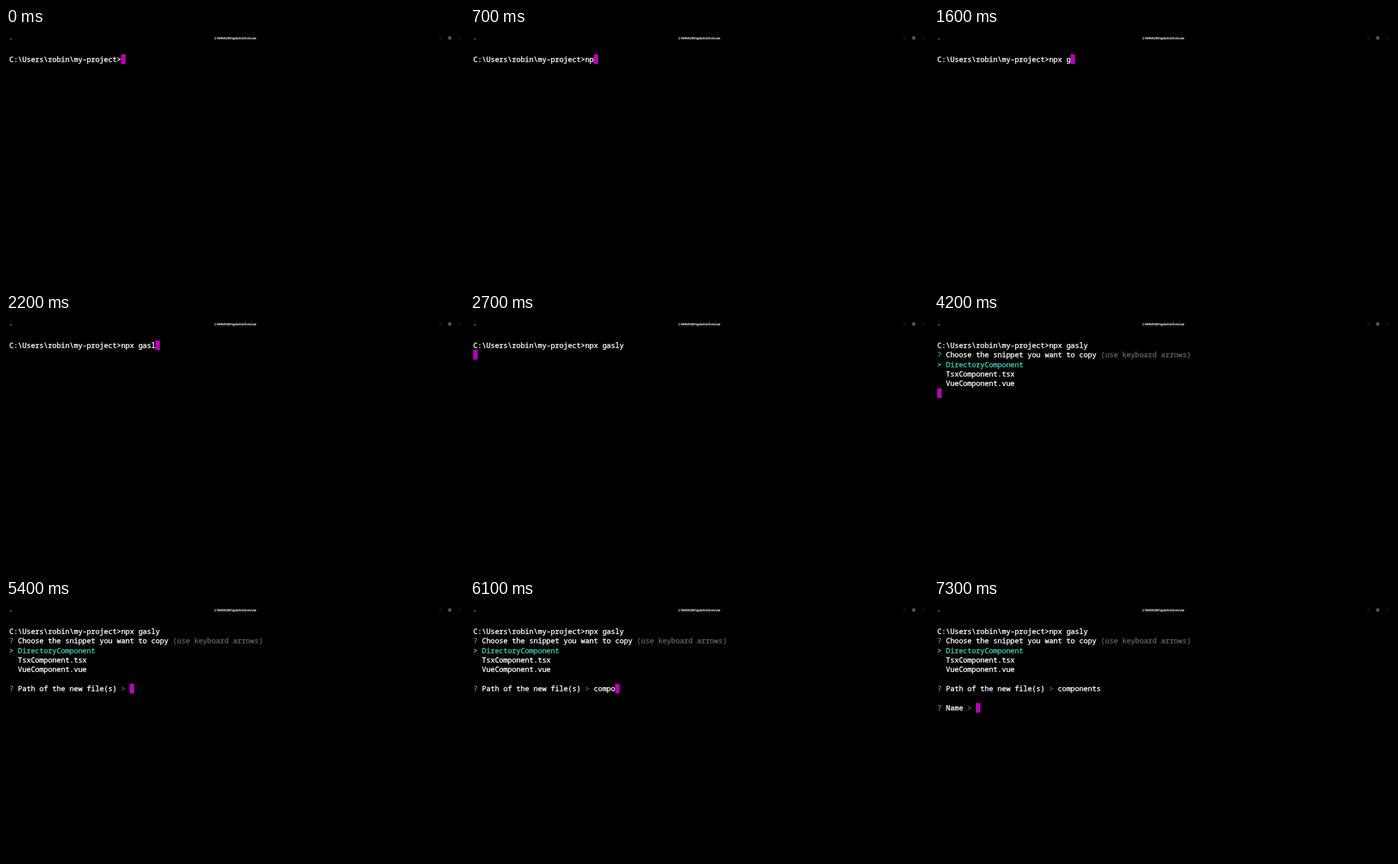
Animation of 690 by 388 pixels, one loop 8 s. Source, as an HTML page:

```html
<!DOCTYPE html>
<html lang="en">
<head>
<meta charset="utf-8">
<title>Terminal</title>
<style>
  html, body { margin: 0; width: 100%; height: 100%; overflow: hidden; background: #000; }
  svg { display: block; width: 690px; height: 388px; }
  text { white-space: pre; text-rendering: geometricPrecision; fill: currentColor; stroke: currentColor; }
  .term { font: 500 10.8px "Noto Sans Mono", "DejaVu Sans Mono", monospace; color: #fff; stroke-width: .35; }
  .title { font: italic 4.5px "Open Sans", "Noto Sans", sans-serif; color: #f4f4f4; stroke-width: .2; }
  .ask { color: #36b02c; }
  .dim { color: #626262; }
  .pick { color: #45cdbb; }
  .cursor { fill: #b800b4; }
</style>
</head>
<body>
<svg viewBox="0 0 690 388">
  <rect width="690" height="388"/>
  <g fill="none" stroke-width=".8">
    <path d="M6 16.5h3" stroke="#aaa"/>
    <path d="M653 15h3" stroke="#444"/>
    <path d="M667 13.5h3v3h-3z" stroke="#ccc"/>
    <path d="M682 14l2 2m0-2l-2 2" stroke="#444" stroke-width=".6"/>
  </g>
  <text class="title" x="345.5" y="17" text-anchor="middle">C:\WINDOWS\system32\cmd.exe</text>
  <g class="term" id="term"></g>
  <rect class="cursor" id="cursor" width="6.8" height="14.4"/>
</svg>
<script>
const LOOP = 8000, CELL = 6.48, LINE = 14.4, LEFT = 5, TOP = 39.7;
const NS = 'http://www.w3.org/2000/svg';
const term = document.getElementById('term');
const cursor = document.getElementById('cursor');

const prompt = 'C:\\Users\\robin\\my-project>';
const items = ['DirectoryComponent', 'TsxComponent.tsx', 'VueComponent.vue'];
const command = { text: 'npx gasly', keys: [500, 700, 900, 1300, 1600, 1800, 2000, 2200, 2300] };
const path = { text: 'components', keys: [5600, 5700, 5800, 6000, 6100, 6400, 6600, 6700, 6800, 6900] };
const enter = 2500, list = 2800, askPath = 4600, askName = 7300;
const moves = [[3300, 1], [3500, 2], [4000, 1], [4200, 0]];

const typed = ({ text, keys }, t) => text.slice(0, keys.filter(k => k <= t).length);

function put(row, col, text, cls = '') {
  const el = document.createElementNS(NS, 'text');
  el.setAttribute('x', LEFT + col * CELL);
  el.setAttribute('y', TOP + row * LINE + 11);
  el.setAttribute('class', cls);
  el.textContent = text;
  term.append(el);
  return col + text.length;
}

function ask(row, text) {
  put(row, 0, '?', 'ask');
  return put(row, 2, text) + 1;
}

// Draws the screen and returns the cursor's row and column.
function screen(t) {
  let col = put(0, 0, prompt);
  col = put(0, col, typed(command, t));
  if (t < enter) return [0, col];
  if (t < list) return [1, 0];

  put(1, ask(1, 'Choose the snippet you want to copy'), '(use keyboard arrows)', 'dim');
  const picked = moves.reduce((now, [at, i]) => at <= t ? i : now, 0);
  items.forEach((name, i) => put(2 + i, 2, name, i === picked ? 'pick' : ''));
  put(2 + picked, 0, '>', 'pick');
  if (t < askPath) return [5, 0];

  col = put(6, ask(6, 'Path of the new file(s)'), '>', 'dim') + 1;
  col = put(6, col, typed(path, t));
  if (t < askName) return [6, col];

  return [8, put(8, ask(8, 'Name'), '>', 'dim') + 1];
}

const cuts = [...command.keys, enter, list, ...moves.map(m => m[0]), askPath, ...path.keys, askName];
const start = performance.now();
let shown = -1;

function frame() {
  const t = (performance.now() - start) % LOOP;
  const step = cuts.filter(c => c <= t).length;
  if (step !== shown) {
    shown = step;
    term.replaceChildren();
    const [row, col] = screen(t);
    cursor.setAttribute('x', LEFT + col * CELL - .2);
    cursor.setAttribute('y', TOP + row * LINE);
  }
  requestAnimationFrame(frame);
}
frame();
</script>
</body>
</html>
```
